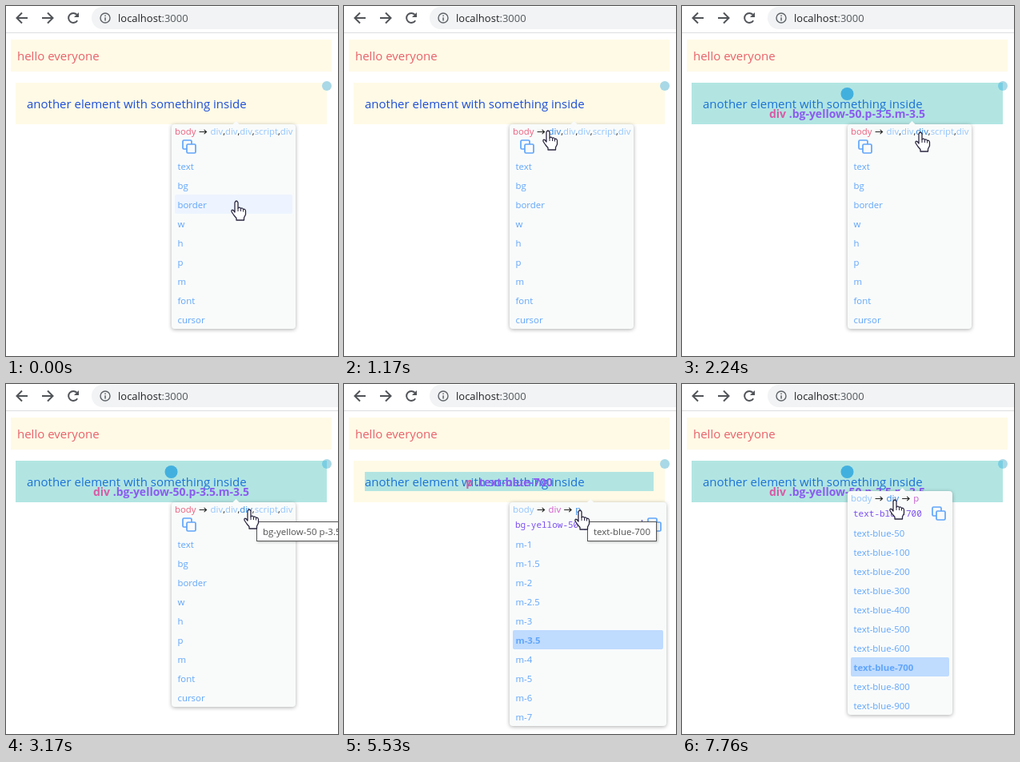
These frames come from a looping animation (415 px wide and 438 px high, 8 s). An HTML page with a canvas:

```html
<!DOCTYPE html>
<html lang="en">
<head>
<meta charset="utf-8">
<title>Class inspector</title>
<style>
html, body { margin: 0; width: 100%; height: 100%; overflow: hidden; background: #fff; }
canvas { display: block; }
</style>
</head>
<body>
<canvas id="stage" width="415" height="438"></canvas>
<script>
const ctx = document.getElementById('stage').getContext('2d');
const LOOP = 8000;
const SANS = '"Open Sans", "Noto Sans", sans-serif';
const MONO = '"Noto Sans Mono", "DejaVu Sans Mono", monospace';
const SMALL = `500 11.4px ${SANS}`;
const SMALL_BOLD = `bold 11.4px ${SANS}`;
const CODE = `11px ${MONO}`;
const LABEL = `bold 14px ${SANS}`;
const BLUE = '#60a5fa', PALE_BLUE = '#93c5fd', HOVER_BLUE = '#2f86e4';
const PURPLE = '#7c4ff0', YELLOW = '#fefae6';

const times = (from, to, t) => t >= from && t < to;

// Page elements that can be outlined, with their label parts.
const boxes = {
  body: { x: 0, y: 42, w: 415, h: 106, tag: 'body', classes: ' .' },
  hello: { x: 6, y: 42, w: 401, h: 40, tag: 'div', classes: ' .bg-yellow-50.p-2.m-1.5' },
  div: { x: 12, y: 96, w: 389, h: 52, tag: 'div', classes: ' .bg-yellow-50.p-3.5.m-3.5' },
  p: { x: 26, y: 110, w: 361, h: 24, tag: 'p', classes: ' .text-blue-700', flat: true }
};

const comma = { text: ',' }, arrow = { arrow: true };
const crumb = (text, box, color = PALE_BLUE) => ({ text, box, color });

const bodyPopup = {
  y: 148, w: 155, h: 256, iconX: 220,
  crumbs: [crumb('body', 'body', '#ea617f'), arrow, crumb('div'), comma, crumb('div', 'hello'), comma,
    crumb('div', 'div'), comma, crumb('script'), comma, crumb('div')],
  rows: ['text', 'bg', 'border', 'w', 'h', 'p', 'm', 'font', 'cursor']
};
const divPopup = {
  y: 148, w: 196, h: 280, iconX: 379, selected: 5,
  input: ['bg-yellow-50 p-3.5 ', 'm-3.5'],
  crumbs: [crumb('body', 'body'), arrow, crumb('div', 'div', '#cf5cc8'), arrow, crumb('p', 'p')],
  rows: [1, 1.5, 2, 2.5, 3, 3.5, 4, 5, 6, 7].map(n => 'm-' + n)
};
const textPopup = {
  y: 134, w: 131, h: 280, iconX: 312, selected: 7,
  input: ['text-blue-700', ''],
  crumbs: [crumb('body', 'body'), arrow, crumb('div', 'div'), arrow, crumb('p', 'p', '#c45dcc')],
  rows: [50, 100, 200, 300, 400, 500, 600, 700, 800, 900].map(n => 'text-blue-' + n)
};
const POPUP_X = 207;

const pointerPath = [
  [0, 288, 244], [70, 288, 243], [400, 262, 203], [690, 229, 156], [760, 228, 155], [940, 228, 155],
  [1370, 279, 157], [1550, 279, 157], [1720, 295, 157], [2240, 298, 158], [2480, 298, 158],
  [2640, 304, 157], [3900, 303, 157], [4190, 295, 158], [7370, 295, 158], [7760, 266, 145], [8000, 266, 145]
];

function pointerAt(t) {
  const i = pointerPath.findIndex(k => k[0] > t);
  const [t0, x0, y0] = pointerPath[i - 1], [t1, x1, y1] = pointerPath[i];
  const f = (t - t0) / (t1 - t0);
  return { x: x0 + (x1 - x0) * f, y: y0 + (y1 - y0) * f };
}

function text(str, x, y, font, color) {
  ctx.font = font;
  ctx.fillStyle = color;
  ctx.fillText(str, x, y);
  return ctx.measureText(str).width;
}

function rect(x, y, w, h, color, radius = 0) {
  ctx.fillStyle = color;
  ctx.beginPath();
  ctx.roundRect(x, y, w, h, radius);
  ctx.fill();
}

function disc(x, y, r, color) {
  ctx.fillStyle = color;
  ctx.beginPath();
  ctx.arc(x, y, r, 0, Math.PI * 2);
  ctx.fill();
}

function stroke(path, color, width) {
  ctx.strokeStyle = color;
  ctx.lineWidth = width;
  ctx.stroke(new Path2D(path));
}

function drawBrowserBar() {
  rect(0, 33, 415, 1, '#dcdee1');
  rect(107, 1, 330, 28, '#f1f3f4', 14);
  stroke('M27 15H14M20 8.5L13.5 15L20 21.5', '#505357', 2);
  stroke('M45 15H58M52 8.5L58.5 15L52 21.5', '#505357', 2);
  stroke('M89.2 18.2A6 6 0 1 1 88.5 10.8', '#505357', 2);
  ctx.fillStyle = '#505357';
  ctx.fill(new Path2D('M91 8V14H85Z'));
  stroke('M118 15a6 6 0 1 0 12 0a6 6 0 1 0 -12 0', '#5f6368', 1.4);
  rect(123.3, 11.5, 1.5, 1.6, '#5f6368');
  rect(123.3, 14.2, 1.5, 4.3, '#5f6368');
  const w = text('localhost', 140, 20, `13px ${SANS}`, '#202124');
  text(':3000', 140 + w, 20, `13px ${SANS}`, '#55595d');
}

function drawPage() {
  rect(6, 42, 401, 40, YELLOW);
  rect(12, 96, 389, 52, YELLOW);
  text('hello everyone', 14, 68, `15px ${SANS}`, '#e9616a');
  text('another element with something inside', 26, 128, `15px ${SANS}`, '#1d4ed8');
  disc(401, 100, 6, '#a9d8e6');
}

function drawOutline({ x, y, w, h, tag, classes, flat }) {
  rect(x, y, w, h, 'rgba(24,185,215,0.33)');
  const cx = x + w / 2, cy = y + h / 2;
  if (!flat) disc(cx, cy - 12, 8, '#42b0de');
  ctx.font = LABEL;
  const left = cx - ctx.measureText(tag + classes).width / 2;
  const baseline = cy + (flat ? 6 : 18);
  const tagWidth = text(tag, left, baseline, LABEL, '#d85ba6');
  text(classes, left + tagWidth, baseline, LABEL, '#8b5cf0');
}

function layoutCrumbs(popup) {
  ctx.font = SMALL;
  let x = POPUP_X + 4;
  return popup.crumbs.map(item => {
    const w = item.arrow ? 18 : ctx.measureText(item.text).width;
    const placed = { item, x, w };
    x += w;
    return placed;
  });
}

function hoveredCrumb(popup, crumbs, { x, y }) {
  if (y < popup.y + 1 || y > popup.y + 18) return null;
  return crumbs.find(c => c.item.color && x >= c.x - 1 && x <= c.x + c.w + 1) || null;
}

function drawCopyIcon(x, y) {
  stroke(`M${x + 6} ${y + 12}h-3.5a1.5 1.5 0 0 1 -1.5 -1.5v-8a1.5 1.5 0 0 1 1.5 -1.5h8` +
    `a1.5 1.5 0 0 1 1.5 1.5V${y + 6}`, BLUE, 1.7);
  ctx.beginPath();
  ctx.roundRect(x + 6, y + 6, 11, 11, 1.5);
  ctx.stroke();
}

function drawPopup(popup, crumbs, hover, pointer, t) {
  const { y, w, h, rows, input } = popup;
  ctx.save();
  ctx.shadowColor = 'rgba(0,0,0,0.32)';
  ctx.shadowBlur = 5;
  ctx.shadowOffsetY = 1;
  rect(POPUP_X, y, w, h, '#f9fbfb', 4);
  ctx.restore();
  const tip = POPUP_X + w / 2 + 3;
  ctx.fillStyle = '#f9fbfb';
  ctx.fill(new Path2D(`M${tip - 5} ${y + 1}L${tip} ${y - 4}L${tip + 5} ${y + 1}Z`));

  for (const c of crumbs) {
    if (c.item.arrow) {
      stroke(`M${c.x + 4} ${y + 9.5}h9M${c.x + 10} ${y + 6.8}l3 2.7l-3 2.7`, '#222', 1.1);
    } else {
      const color = c === hover ? HOVER_BLUE : c.item.color || '#222';
      text(c.item.text, c.x, y + 13, SMALL, color);
    }
  }

  if (input) {
    const start = text(input[0], 214, y + 32, CODE, PURPLE);
    const end = start + text(input[1], 214 + start, y + 32, `bold ${CODE}`, PURPLE);
    if (caretVisible(t)) rect(Math.round(214 + end), y + 22, 1, 12, '#4338a8');
  }
  drawCopyIcon(popup.iconX, y + 19);

  const selected = t >= 3450 ? popup.selected : -1;
  rows.forEach((row, i) => {
    const top = y + 41 + i * 24;
    const active = i === selected;
    const hovered = !input && pointer.y >= top && pointer.y < top + 24;
    if (active) rect(211, top - 1, w - 8, 24, '#bfdbfe', 2);
    else if (hovered) rect(211, top - 1, w - 8, 24, '#edf4ff', 2);
    text(row, 214.5, top + 16, active ? SMALL_BOLD : SMALL, BLUE);
  });
}

function caretVisible(t) {
  if (t >= 6830) return t < 7390;
  return times(3450, 3980, t) || times(4520, 5060, t) || times(5530, 6060, t) || t >= 6600;
}

function drawTooltip(str, x) {
  ctx.font = `11.5px ${SANS}`;
  const w = Math.round(ctx.measureText(str).width) + 16;
  ctx.save();
  ctx.shadowColor = 'rgba(0,0,0,0.25)';
  ctx.shadowBlur = 3;
  ctx.shadowOffsetX = ctx.shadowOffsetY = 1;
  rect(x, 172, w, 25, '#fff');
  ctx.restore();
  ctx.strokeStyle = '#555';
  ctx.lineWidth = 1;
  ctx.strokeRect(x + 0.5, 172.5, w - 1, 24);
  text(str, x + 8, 189, `11.5px ${SANS}`, '#4f4f4f');
}

const pointerShapes = {
  hand: 'M-2 2Q0 -2 2 2V9Q4 7 5.5 9.5Q7.5 8 8.5 10.5Q11 9.5 11.5 12.5V17L9.5 21V24H0V21.5' +
    'L-3 18L-6 13.5Q-6.5 10.5 -4 11.5L-2 14Z',
  arrow: 'M0 0V16L3.8 12.6L6.3 18.4L8.9 17.3L6.4 11.6H11.5Z'
};

function drawPointer(kind, { x, y }) {
  ctx.save();
  ctx.translate(Math.round(x), Math.round(y));
  ctx.lineJoin = 'round';
  if (kind === 'beam') {
    stroke('M-3 -7.5H3M0 -7.5V7.5M-3 7.5H3', '#333', 1);
  } else {
    ctx.fillStyle = '#fff';
    ctx.fill(new Path2D(pointerShapes[kind]));
    stroke(pointerShapes[kind], '#2b2740', 1.3);
    if (kind === 'hand') stroke('M2 9V13M5.5 10V13M8.5 11V13.5', '#2b2740', 1);
  }
  ctx.restore();
}

function pointerKind(popup, hover, pointer) {
  if (hover) return 'hand';
  const depth = pointer.y - popup.y;
  if (popup === bodyPopup && depth > 18) return 'hand';
  return popup.input && depth > 18 ? 'beam' : 'arrow';
}

function render(t) {
  const popup = t < 3240 ? bodyPopup : t < 6830 ? divPopup : textPopup;
  const pointer = pointerAt(t);
  const crumbs = layoutCrumbs(popup);
  const hover = hoveredCrumb(popup, crumbs, pointer);

  rect(0, 0, 415, 438, '#fff');
  drawBrowserBar();
  drawPage();
  if (hover && hover.item.box) drawOutline(boxes[hover.item.box]);
  drawPopup(popup, crumbs, hover, pointer, t);
  if (times(3170, 3310, t)) drawTooltip('bg-yellow-50 p-3.5 m-3.5', 313);
  if (times(4710, 6760, t)) drawTooltip('text-blue-700', 304);
  drawPointer(pointerKind(popup, hover, pointer), pointer);
}

function tick() {
  render(performance.now() % LOOP);
  requestAnimationFrame(tick);
}
tick();
</script>
</body>
</html>
```
